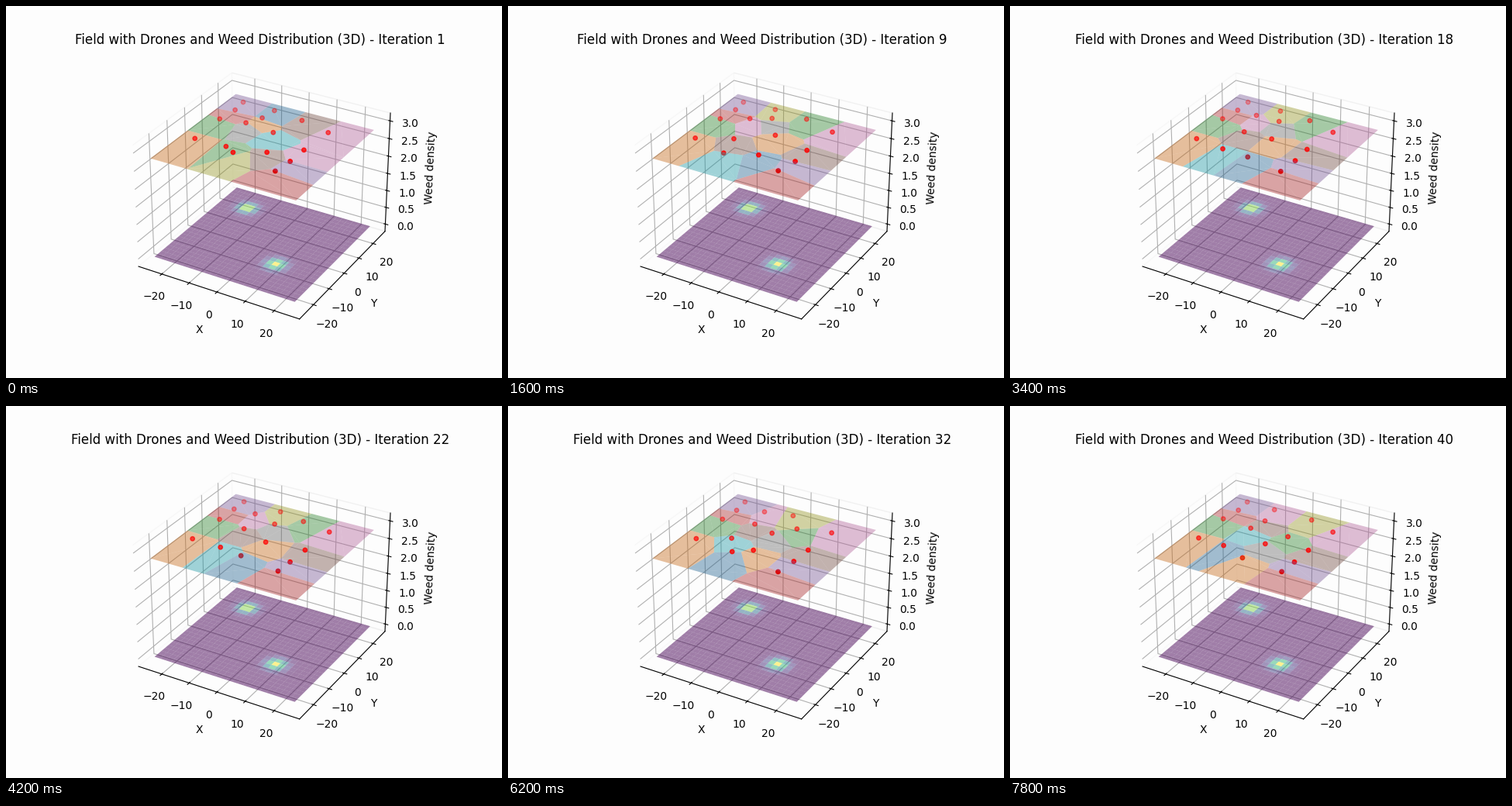
A matplotlib script for the animation above (8000 ms loop, 640 px wide and 480 px high).

```python
import numpy as np
import matplotlib.pyplot as plt
from matplotlib.animation import FuncAnimation

W, H = 640, 480
FRAMES, INTERVAL = 40, 200
HALF = 25          # half width of the field
CELL_Z, DRONE_Z = 2.8, 3.0
RECOLOUR = 4       # step at which the cells take their lasting colours
JITTER = 0.25
PAPER = "#fdfdfd"

# First colour, lasting colour, then the stage pixels a drone holds or drifts
# through (start, middle, end).
DRONES = [
    # rim
    ("C4", "C4", (306, 124)),
    ("C3", "C3", (295, 134)),
    ("C2", "C2", (276, 146)),
    ("C1", "C1", (242, 171)),
    ("C6", "C6", (417, 163)),
    ("C6", "C5", (385, 186)),
    ("C4", "C4", (369, 201)),
    ("C3", "C3", (349, 213)),
    # inner circulation
    ("C0", "C8", (347, 135), (350, 136), (387, 147)),
    ("C5", "C2", (381, 148), (385, 149), (359, 169)),
    ("C1", "C7", (330, 145), (346, 151), (331, 178)),
    ("C7", "C6", (310, 151), (321, 140), (341, 134)),
    ("C2", "C5", (283, 181), (305, 160), (330, 148)),
    ("C9", "C1", (346, 163), (336, 175), (300, 196)),
    ("C5", "C0", (337, 189), (306, 194), (276, 180)),
    ("C8", "C9", (294, 189), (276, 183), (309, 158)),
]

fig = plt.figure(figsize=(W / 100, H / 100), dpi=100, facecolor=PAPER)
ax = fig.add_subplot(111, projection="3d", facecolor=PAPER)


def padded(lo, hi):
    """Limits with the usual 5 % data margin and 1/48 view margin."""
    pad = 0.05 * (hi - lo)
    pad += (hi - lo + 2 * pad) / 48
    return lo - pad, hi + pad


def weed(x, y):
    return sum(np.exp(-((x - cx) ** 2 + (y - cy) ** 2) / 8)
               for cx, cy in ((10, -10), (-15, 15)))


ax.set_xlim(*padded(-HALF, HALF))
ax.set_ylim(*padded(-HALF, HALF))
ax.set_zlim(*padded(0, DRONE_Z))
ax.set_xlabel("X")
ax.set_ylabel("Y")
ax.set_zlabel("Weed density")
for axis in (ax.xaxis, ax.yaxis, ax.zaxis):
    axis.pane.set_facecolor(PAPER)

side = np.linspace(-HALF, HALF, 2 * HALF + 1)
gx, gy = np.meshgrid(side, side)
ax.plot_surface(gx, gy, 0.02 * weed(gx, gy), rstride=2, cstride=2,
                cmap="viridis", alpha=0.5)

# Map from stage pixels to the plane the drones fly in
fig.canvas.draw()
proj = ax.get_proj()[[0, 1, 3]]
plane = np.column_stack([proj[:, 0], proj[:, 1], proj[:, 2] * DRONE_Z + proj[:, 3]])
to_field = np.linalg.inv(plane)


def field_pos(px, py):
    sx, sy = ax.transData.inverted().transform((px, H - py))
    x, y, w = to_field @ (sx, sy, 1)
    return np.array([x / w, y / w])


PATHS = [[field_pos(*p) for p in points] for _, _, *points in DRONES]


def along(path, t):
    """Point at t on the parabola through start, middle and end."""
    if len(path) == 1:
        return path[0]
    a, b, c = path
    return a * (1 - 2 * t) * (1 - t) + b * 4 * t * (1 - t) + c * t * (2 * t - 1)


def positions(step):
    noise = np.random.default_rng(step).normal(0, JITTER, (len(PATHS), 2))
    return np.array([along(path, step / (FRAMES - 1)) for path in PATHS]) + noise


def clip(poly, normal, limit):
    """Keep the part of a convex polygon where p . normal <= limit."""
    out = []
    for a, b in zip(poly, poly[1:] + poly[:1]):
        da, db = a @ normal - limit, b @ normal - limit
        if da <= 0:
            out.append(a)
        if da * db < 0:
            out.append(a + (b - a) * da / (da - db))
    return out


def cell(i, pts):
    """Voronoi cell of drone i inside the field."""
    poly = [HALF * np.array(c, float) for c in ((-1, -1), (1, -1), (1, 1), (-1, 1))]
    for j, q in enumerate(pts):
        if j != i:
            normal = q - pts[i]
            poly = clip(poly, normal, normal @ (q + pts[i]) / 2)
    return np.array(poly)


shown = []


def update(step):
    while shown:
        shown.pop().remove()
    pts = positions(step)
    for i, (first, lasting, *_) in enumerate(DRONES):
        poly = cell(i, pts)
        colour = first if step < RECOLOUR else lasting
        shown.append(ax.plot_trisurf(poly[:, 0], poly[:, 1], np.full(len(poly), CELL_Z),
                                     color=colour, alpha=0.4))
    shown.append(ax.scatter(pts[:, 0], pts[:, 1], DRONE_Z, color="red", s=15))
    ax.set_title(f"Field with Drones and Weed Distribution (3D) - Iteration {step + 1}")
    return shown


anim = FuncAnimation(fig, update, frames=FRAMES, interval=INTERVAL,
                     repeat=True, repeat_delay=0, blit=False)
plt.show()
```
